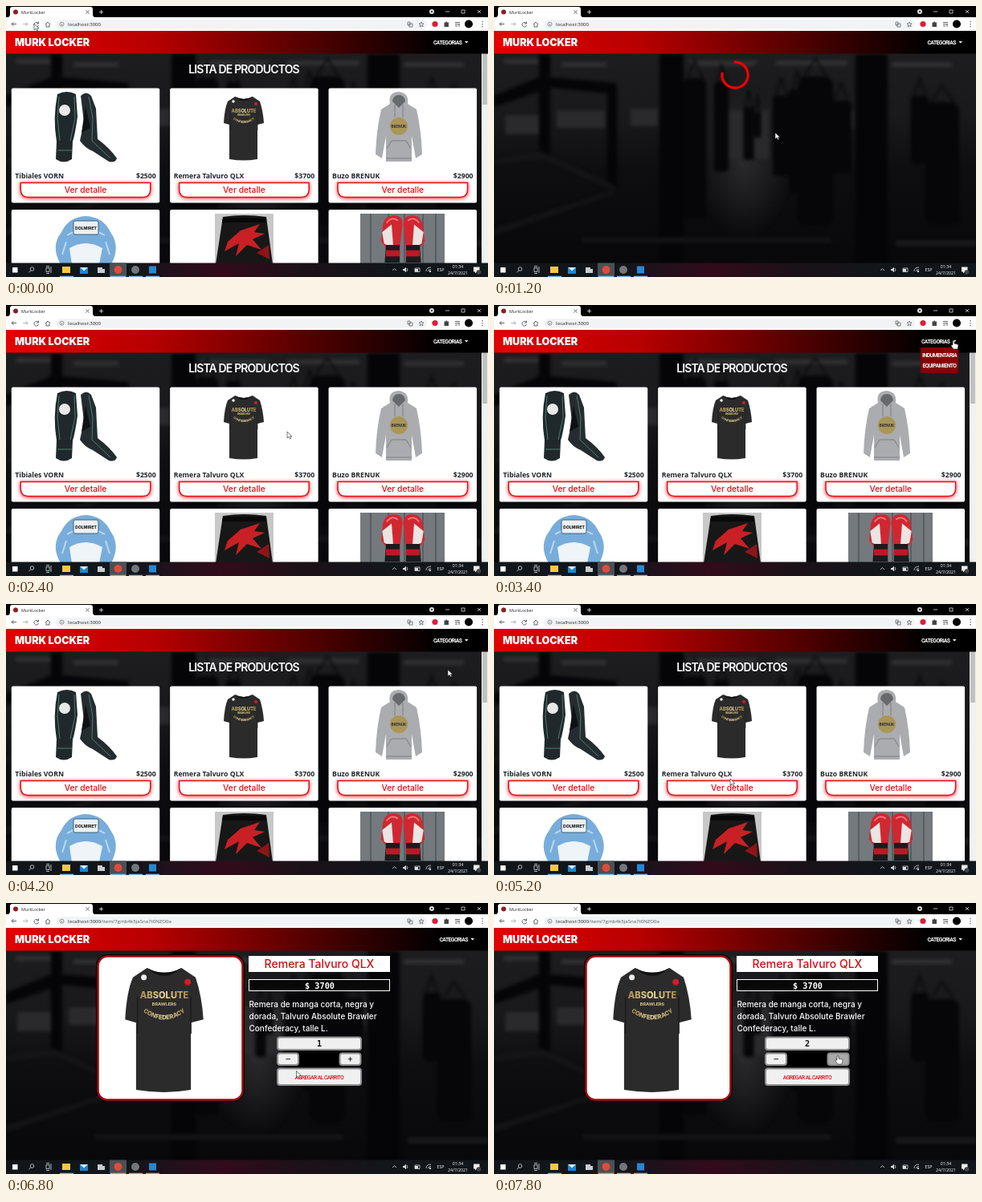
Animation, 600 px wide and 338 px high, one loop 8000 ms. Source, as an HTML page:

```html
<!DOCTYPE html>
<html lang="es">
<head>
<meta charset="utf-8">
<title>MurkLocker</title>
<style>
  html, body { margin: 0; width: 100%; height: 100%; overflow: hidden; background: #000; }
  svg { display: block; width: 100vw; height: 100vh; }
  .ui { font: 6.1px "Open Sans", sans-serif; }
  .brand { font: 900 12.6px Inter, sans-serif; }
  .narrow { font: 700 6.8px Roboto, sans-serif; letter-spacing: -.55px; }
  .heading { font: 600 14px Inter, sans-serif; }
  .name { font: 700 8.7px "Open Sans", sans-serif; fill: #212529; }
  .button { font: 500 10.3px Inter, sans-serif; fill: #e00d12; }
  .mono { font: 700 10.2px "DejaVu Sans Mono", monospace; }
  .body { font: 500 10px Inter, sans-serif; }
  .print { font: 800 5.7px Inter, sans-serif; }
  .middle { text-anchor: middle; }
  .end { text-anchor: end; }
  .line { fill: none; stroke: #5f6368; stroke-width: 1; }
  .light { stroke: #ddd; stroke-width: .8; }
  .glow { filter: drop-shadow(0 1px 2.5px #ff3038); }
  .soft { filter: blur(2px); }
</style>
</head>
<body>
<svg viewBox="0 0 600 338">
  <defs>
    <linearGradient id="room" x2="0" y2="1">
      <stop stop-color="#1d1d1f"/><stop offset=".3" stop-color="#19191b"/>
      <stop offset=".55" stop-color="#0e0e10"/><stop offset="1" stop-color="#08080a"/>
    </linearGradient>
    <radialGradient id="floor">
      <stop stop-color="#2a2a2c"/><stop offset="1" stop-color="#2a2a2c" stop-opacity="0"/>
    </radialGradient>
    <linearGradient id="nav">
      <stop stop-color="#e20000"/><stop offset=".3" stop-color="#b80000"/>
      <stop offset=".62" stop-color="#560000"/><stop offset=".9"/>
    </linearGradient>
    <linearGradient id="bar">
      <stop offset=".25" stop-color="#11161b"/><stop offset=".45" stop-color="#320b1b"/>
      <stop offset=".62" stop-color="#1c1118"/><stop offset=".8" stop-color="#11161b"/>
    </linearGradient>
    <linearGradient id="gold"><stop stop-color="#a98a4c"/><stop offset=".5" stop-color="#ead79c"/><stop offset="1" stop-color="#b08b3f"/></linearGradient>
    <path id="printArc" d="M-17 25Q0 41 17 25"/>
  </defs>

  <rect y="58" width="600" height="264" fill="url(#room)"/>
  <g class="soft">
    <ellipse cx="312" cy="195" rx="60" ry="95" fill="url(#floor)"/>
    <path d="M12 66H60V72H12ZM84 70H140V76H84ZM240 68H330L322 75H250ZM350 68H440V74H350ZM495 70H570V76H495Z" fill="#303032"/>
    <path d="M14 136H56V160H14ZM78 130H138V152H78ZM170 128H204V150H170ZM292 130H342V190H292ZM420 130H448V152H420Z" fill="#2a2a2c"/>
    <path d="M56 60H70V190H56ZM0 112L58 88L152 96V110L70 102L0 126ZM141 98H153V226H141ZM206 60H236V322H206ZM450 60H490V322H450Z" fill="#050507"/>
    <path d="M0 190L60 182L150 224V230L60 190L0 198ZM0 278L150 230V234L0 286ZM110 289H420V295H110Z" fill="#151517"/>
    <path d="M500 292H600V300H500Z" fill="#19191b"/>
    <g id="bags"></g>
  </g>
  <g id="page"></g>

  <rect y="31" width="600" height="28.5" fill="url(#nav)"/>
  <text class="brand" x="11" y="49.5" fill="#fff">MURK LOCKER</text>
  <g id="menu"></g>

  <rect width="600" height="14" fill="#000"/>
  <path d="M2 14Q5 14 5 10V4Q5 1 8 1H105Q108 1 108 4V10Q108 14 111 14Z" fill="#fff"/>
  <circle cx="12" cy="7.5" r="3" fill="#8d2020"/>
  <text class="ui" x="19" y="9.6" style="font-size:5.4px" fill="#222">MurkLocker</text>
  <path class="line" d="M99.500 5.500L103.500 9.500M103.500 5.500L99.500 9.500"/>
  <path class="line light" d="M116 7.500H121M118.500 5V10M547 7H552M567 5H571V9H567ZM587 5L591 9M591 5L587 9"/>
  <circle cx="530" cy="7" r="3" fill="#ddd"/><circle cx="530" cy="7" r="1" fill="#111"/>
  <rect y="14" width="600" height="17" fill="#fff"/>
  <rect x="62" y="17" width="462" height="11.500" rx="5.700" fill="#f1f3f4"/>
  <path class="line" d="M13 22.500H7M9.500 20L7 22.500L9.500 25M49 23L52 20L55 23M50 22.500V26H54V22.500"/>
  <path class="line" stroke-opacity=".45" d="M21 22.500H27M24.500 20L27 22.500L24.500 25"/>
  <circle class="line" cx="69.500" cy="22.700" r="2.500" style="stroke-width:.7"/>
  <path class="line" style="stroke-width:.8" d="M69.500 22.300V24M500 20H503V24H500ZM502 22H506V26H502ZM517 20L518 22H520L518.300 23.500L519 26L517 24.500L515 26L515.700 23.500L514 22H516Z"/>
  <circle cx="534" cy="22.500" r="3.600" fill="#df1c3a"/>
  <path d="M545.500 20.500H547.500V19.500H549V20.500H551V26H545.500Z" fill="#444"/>
  <path class="line" d="M559 20.500H565M559 22.700H565M559 25H562M564 23V26"/>
  <circle cx="576" cy="22.500" r="5"/>
  <path d="M592.500 19h1.200v1.200h-1.200zm0 3h1.200v1.200h-1.200zm0 3h1.200v1.200h-1.200z" fill="#555"/>
  <g id="browser"></g>

  <rect y="320.500" width="600" height="18" fill="url(#bar)"/>
  <rect x="129" y="320.500" width="21" height="18" fill="#4a5053"/>
  <rect x="8" y="326" width="6.500" height="6.500" fill="#fff"/>
  <circle class="line light" cx="32.500" cy="328" r="2.300"/>
  <path class="line light" d="M30.800 329.700L28.500 332.300M50 326.500H54V331.500H50ZM50 324.500H54M50 333.500H54M56 325V333"/>
  <rect x="70" y="325" width="10" height="8" fill="#f5c747"/>
  <path d="M92 326H102V334H92Z" fill="#1686d9"/><path d="M92 326L97 330.500L102 326" fill="#d9f0ff"/>
  <path d="M114 326H120V328H123V333H114Z" fill="#c9cdd0"/>
  <circle cx="139.500" cy="329" r="5" fill="#dd4b3e"/>
  <circle cx="161" cy="329" r="5" fill="#74777a"/>
  <rect x="178" y="324.500" width="9" height="9" fill="#2588d2"/>
  <path d="M67 336.700H84V338H67ZM130 336.700H149V338H130ZM153 336.700H170V338H153ZM174 336.700H191V338H174Z" fill="#8ab9e5"/>
  <path class="line light" d="M481 330L483.500 327.500L486 330M497.500 326V332M499 327Q501 329 499 331M509 327H515V331.500H509ZM523 331Q523 326 529 326M525.500 331Q525.500 328.500 529 328.500"/>
  <path d="M494 328H495.500L498 326V332L495.500 330H494ZM509 328H513V331H509ZM527 330H529V332H527Z" fill="#ddd"/>
  <g fill="#fff">
    <text class="ui" x="536.500" y="331" style="font-size:5.300px">ESP</text>
    <text class="ui middle" x="562.500" y="327" style="font-size:5.300px">01:34</text>
    <text class="ui middle" x="562.500" y="335" style="font-size:5.300px">24/7/2021</text>
  </g>
  <path d="M582 325.500H589.500V331.500H586L584 333.500V331.500H582Z" fill="#eee"/>
  <circle cx="588.500" cy="332" r="2.800" fill="#444"/>
  <g id="pointer"></g>
</svg>
<script>
const LOOP = 8000, STEP = 200;
const RELOAD_AT = 400, LIST_AT = 1540, ITEM_CLICK = 5860, ITEM_AT = 6600;
const layer = id => document.getElementById(id);
const clamp = x => Math.max(0, Math.min(1, x));
const smooth = x => x * x * (3 - 2 * x);
const mix = (a, b, k) => a + (b - a) * k;

const rect = (x, y, w, h, fill, extra = '') =>
  `<rect x="${x}" y="${y}" width="${w}" height="${h}" fill="${fill}" ${extra}/>`;
const circle = (x, y, r, fill) => `<circle cx="${x}" cy="${y}" r="${r}" fill="${fill}"/>`;
const path = (d, fill, extra = '') => `<path d="${d}" fill="${fill}" ${extra}/>`;
const text = (x, y, cls, value, extra = '') => `<text x="${x}" y="${y}" class="${cls}" ${extra}>${value}</text>`;

// Punching bags: centre, top, width, height.
layer('bags').innerHTML = [[250, 90, 28, 175], [283, 95, 18, 112], [317, 126, 13, 66], [328, 132, 9, 32],
  [358, 112, 22, 100], [378, 104, 22, 130], [400, 88, 44, 186], [432, 118, 26, 90], [530, 112, 22, 85], [558, 120, 42, 153]]
  .map(([x, y, w, h]) => rect(x - w / 2, y, w, h, '#060608', `rx="${w / 4}"`) +
    path(`M${x - w / 3} ${y}L${x} ${y - 22}L${x + w / 3} ${y}`, 'none', 'stroke="#08080a" stroke-width="2"')).join('');

function shirt(x, y, scale) {
  return `<g transform="translate(${x} ${y}) scale(${scale})">` +
    path('M-11 0Q0 6 11 0L20 6Q24 18 25 33L17 35V78Q0 81-18 78V35L-25 33Q-24 15-20 6Z', '#2b2b2c') +
    path('M-11 0Q0 6 11 0Q0 10-11 0', '#111') +
    path('M-17 18V42M17 18V42', 'none', 'stroke="#1b1b1b" stroke-width=".7"') +
    circle(-13, 6, 1.8, '#eee') + circle(15, 9, 2, '#d21d2c') +
    text(0, 19.5, 'print middle', 'ABSOLUTE', 'fill="url(#gold)"') +
    text(0, 24.3, 'print middle', 'BRAWLERS', 'fill="#cdb878" style="font-size:2.800px"') +
    '<text class="print middle" fill="url(#gold)" style="font-size:3.900px"><textPath href="#printArc" startOffset="50%">CONFEDERACY</textPath></text></g>';
}

const shinGuards = () =>
  path('M64 110Q76 104 87 110L89 138Q86 160 83 169L82 191Q72 198 62 191L63 169Q58 140 64 110Z', '#20282b') +
  path('M93 112Q100 105 106 112L112 128L114 166Q129 177 138 190Q136 196 128 194L108 181Q98 177 92 168L97 145Z', '#252c2f') +
  path('M66 113L64 140L67 168M85 113L86 140L80 168M103 113L108 140L107 168L130 190M64 180H82', 'none', 'stroke="#45806f"') +
  path('M99 125L94 158L105 152Z', '#0e1214') + circle(73, 130, 7, '#e8e8e8');

const hoodie = () =>
  path('M478 122Q475 108 488 107Q502 108 500 122L511 129Q517 155 518 185L510 190L505 162V194H473V162L468 190L460 185Q461 155 467 129Z', '#abacaf') +
  path('M481 119Q482 111 489 111Q496 111 497 119L489 127Z', '#68696d') +
  path('M484 123V139M494 123V139M474 178L480 168H498L504 178M473 190H505', 'none', 'stroke="#7e7f83"') +
  circle(489, 150, 11, '#aa9657') + text(489, 152, 'print middle', 'BRENUK', 'fill="#383838" style="font-size:4.500px"');

const headgear = () =>
  path('M68 322Q55 300 69 282Q78 263 99 262Q121 263 130 282Q143 300 131 322Z', '#78addb') +
  path('M82 322L79 302Q99 290 120 302L116 322Z', '#eef4f8') +
  path('M76 286Q99 272 123 286M75 294L70 310M124 294L129 310', 'none', 'stroke="#bad9f2" stroke-width="2"') +
  rect(84, 268, 31, 17, '#edf1f3', 'rx="2" stroke="#37627e"') +
  text(99.5, 279, 'print middle', 'DOLMIRET', 'fill="#222" style="font-size:5.200px"');

const shorts = () =>
  rect(260, 259, 73, 64, '#c8c8c9') +
  path('M270 263Q296 259 324 263L332 322H261Z', '#171717') +
  path('M270 264H324V270H269Z', '#090909') +
  path('M276 294L292 280L316 272L309 282L322 284L307 291L318 304L300 298L286 312L290 296L272 306Z', '#c82025') +
  path('M312 308L327 298L328 316Z', '#8d1519');

const glove = (x, flip) => `<g transform="translate(${x} 261) scale(${flip * .78} .95)">` +
  path('M-17 14Q-19 1-5 0Q12 0 14 14L17 34L8 44H-13Z', '#d12731') +
  path('M0 12L15 22L12 37L-3 44Z', '#e9e5e2') + path('M-13 39H9L11 62H-13Z', '#1b1b1e') +
  path('M-13 46H9V54H-13Z', '#bd1825') + path('M-10 7Q0 1 8 10', 'none', 'stroke="#f17c80" stroke-width="2"') + '</g>';

const gloves = () =>
  rect(441, 259, 105, 64, '#74797d') +
  path('M454 259V322M476 259V322M496 259V322M519 259V322M535 259V322', 'none', 'stroke="#50565b" stroke-width="1.500"') +
  glove(480, -1) + glove(508, 1);

const products = [
  { name: 'Tibiales VORN', price: 2500, draw: shinGuards, narrow: 140, loaded: 1700 },
  { name: 'Remera Talvuro QLX', price: 3700, draw: () => shirt(296, 113, 1), narrow: 156, loaded: 1900 },
  { name: 'Buzo BRENUK', price: 2900, draw: hoodie, narrow: 140, loaded: 1700 },
  { name: 'Cabezal Dolmiret', price: 1600, draw: headgear, narrow: 140, loaded: 1900 },
  { name: 'Short Zurak', price: 4100, draw: shorts, narrow: 120, loaded: 1900 },
  { name: 'Guantes', price: 5200, draw: gloves, narrow: 120, loaded: 1700 }
];

function card(product, index, t) {
  const ready = t < RELOAD_AT || t >= product.loaded;
  const width = ready ? 184.5 : product.narrow;
  const center = 99 + index % 3 * 197.4, top = index < 3 ? 102.5 : 254;
  const left = center - width / 2, right = center + width / 2;
  const labelY = top + (ready ? 112.5 : 33.5);
  const phase = t / STEP % 2;
  const dots = circle(center - 10.5, top + 9, 3.5, phase ? '#e12b38' : '#ffd5dc') +
    circle(center + 10.5, top + 9, 3.5, phase ? '#ffd5dc' : '#e12b38');
  return rect(left, top, width, 143, '#fff', 'rx="2"') + (ready ? product.draw() : dots) +
    text(left + 4.5, labelY, 'name', product.name) +
    text(right - 4.5, labelY, 'name end', '$' + product.price) +
    path(`M${left + 11.5} ${top + 118}H${right - 11.5}V${top + 127}Q${right - 12} ${top + 136} ${right - 21} ${top + 136}` +
      `H${left + 21}Q${left + 12} ${top + 136} ${left + 11.5} ${top + 127}Z`, '#fff', 'class="glow" stroke="#e30d14" stroke-width="1.500"') +
    text(center, top + 130.5, 'button middle', 'Ver detalle');
}

function listPage(t) {
  const rest = t < RELOAD_AT ? 0 : (1 - clamp((t - LIST_AT) / 700)) ** 3;
  const style = `letter-spacing:${-.85 + 14 * rest}px;opacity:${1 - rest};` + (rest ? `filter:blur(${4 * rest}px)` : '');
  return text(296, 84, 'heading middle', 'LISTA DE PRODUCTOS', `fill="#fff" style="${style}"`) +
    products.map((product, i) => card(product, i, t)).join('') +
    rect(592, 31, 8, 290, '#f1f1f1') + rect(593, 39, 6, 84, '#c1c1c1') +
    path('M594 36L596 33.500L598 36Z', '#666');
}

// Indeterminate ring: the arc grows, then its tail catches up, while the whole ring turns.
function spinner(elapsed) {
  const p = elapsed / 1400 % 1, grow = smooth(clamp(p * 2)), shrink = smooth(clamp(p * 2 - 1));
  return `<circle r="20.200" transform="translate(300 86) rotate(${360 * p}) scale(.8)" fill="none" stroke="#f00000"
    stroke-width="4" stroke-dasharray="${mix(1, 100, grow)} 200" stroke-dashoffset="${-15 * grow - 110 * shrink}"/>`;
}

function control(x, y, w, h, fill = '#f0f0f0') {
  return rect(x, y, w, h, fill, 'rx="3" stroke="#909090" stroke-width="2"');
}

function itemPage(t) {
  const added = t >= 7600;
  return rect(114, 66, 181, 180, '#fff', 'rx="12" stroke="#080000" stroke-width="4"') +
    rect(114.5, 66.5, 180, 179, '#fff', 'rx="12" stroke="#a50b0e" stroke-width="2.500"') + shirt(197, 81, 1.95) +
    rect(302, 66, 176, 20, '#fff') +
    text(390, 81, 'heading middle', 'Remera Talvuro QLX', 'fill="#c91216" style="font-weight:500"') +
    rect(302.5, 95.5, 175, 14, '#080808', 'stroke="#fff"') + text(390.5, 106.5, 'mono middle', '$ 3700', 'fill="#fff"') +
    ['Remera de manga corta, negra y', 'dorada, Talvuro Absolute Brawler', 'Confederacy, talle L.']
      .map((line, i) => text(302.5, 130 + i * 15, 'body', line, 'fill="#fff"')).join('') +
    rect(337, 187, 106, 16, '#000') + control(338, 167.5, 104, 15.5) +
    text(390, 179, 'mono middle', added ? 2 : 1, 'fill="#111"') +
    control(338, 187.5, 26, 14.5) + control(415.5, 187.5, 26, 14.5, added ? '#aaa' : '#f0f0f0') +
    path('M348.500 194.700H354M426 194.700H431M428.500 192V197.500', 'none', 'stroke="#222"') +
    control(338, 206.5, 104, 20.5) + text(390, 219.5, 'narrow middle', 'AGREGAR AL CARRITO', 'fill="#d31319" style="font-weight:500"');
}

function menu(listVisible, t) {
  const shift = listVisible ? 0 : 7.5;
  const open = t >= 3200 && t < 4000;
  return text(567.5 + shift, 47.5, 'narrow end', 'CATEGORIAS', 'fill="#fff"') +
    path(`M${571 + shift} 44H${575.5 + shift}L${573.2 + shift} 46.500Z`, '#fff') +
    (open ? rect(531, 53, 47, 32, '#850207', 'rx="1"') +
      text(554.5, 64.5, 'narrow middle', 'INDUMENTARIA', 'fill="#fff"') +
      text(554.5, 78, 'narrow middle', 'EQUIPAMIENTO', 'fill="#fff"') : '');
}

function browser(t) {
  const route = '/item/7gmb4k5jaSna7t0NZO0a', onItem = t >= ITEM_CLICK;
  const busy = t >= 200 && t < 800;
  const icon = busy ? 'M35.500 20.500L40 25M40 20.500L35.500 25' : 'M40 21.500A2.800 2.800 0 1 0 40.500 24M40.500 19.500V22H38';
  return path(icon, 'none', 'class="line"') +
    `<text class="ui" x="77" y="24.900" fill="#202124">localhost:3000<tspan fill="#55595e">${onItem ? route : ''}</tspan></text>` +
    (t >= 5400 && t < 6400 ? rect(0, 311.5, 111, 9, '#101214') +
      text(2, 318, 'ui', 'localhost:3000' + route, 'fill="#fff" style="font-size:5.300px"') : '');
}

const pointerKeys = [[0, 35, 22], [400, 35, 22], [1200, 350, 158], [2600, 350, 158], [3400, 571, 44], [3800, 560, 66],
  [4200, 550, 82], [5200, 294, 218], [5800, 296, 229], [6400, 296, 229], [7200, 427, 190], [8000, 427, 190]];

function pointer(t) {
  const next = pointerKeys.findIndex(key => key[0] > t);
  const [t0, x0, y0] = pointerKeys[next - 1], [t1, x1, y1] = pointerKeys[next];
  const k = smooth((t - t0) / (t1 - t0));
  const hand = t >= 3200 && t < 4000 || t >= 5400 && t < ITEM_CLICK || t >= 7200;
  const shape = hand
    ? 'M0 1Q1 0 2 1V4L6 5Q7 5 7 7L6 11H1L-2 7Q-2 5 0 6Z'
    : 'M0 0V8L2 6.200L3.500 9L4.800 8.300L3.500 5.800H6Z';
  return `<g transform="translate(${mix(x0, x1, k)} ${mix(y0, y1, k)})">` +
    path(shape, '#fff', 'stroke="#222" stroke-width=".6"') + '</g>';
}

function render(t) {
  const listVisible = t < RELOAD_AT || t >= LIST_AT && t < ITEM_CLICK;
  layer('page').innerHTML = listVisible ? listPage(t)
    : t >= ITEM_AT ? itemPage(t)
    : spinner(t - (t < LIST_AT ? RELOAD_AT : ITEM_CLICK));
  layer('menu').innerHTML = menu(listVisible, t);
  layer('browser').innerHTML = browser(t);
  layer('pointer').innerHTML = pointer(t);
}

let shown = -1;
function tick() {
  const t = Math.floor(performance.now() % LOOP / STEP) * STEP;
  if (t !== shown) render(shown = t);
  requestAnimationFrame(tick);
}
tick();
</script>
</body>
</html>
```
